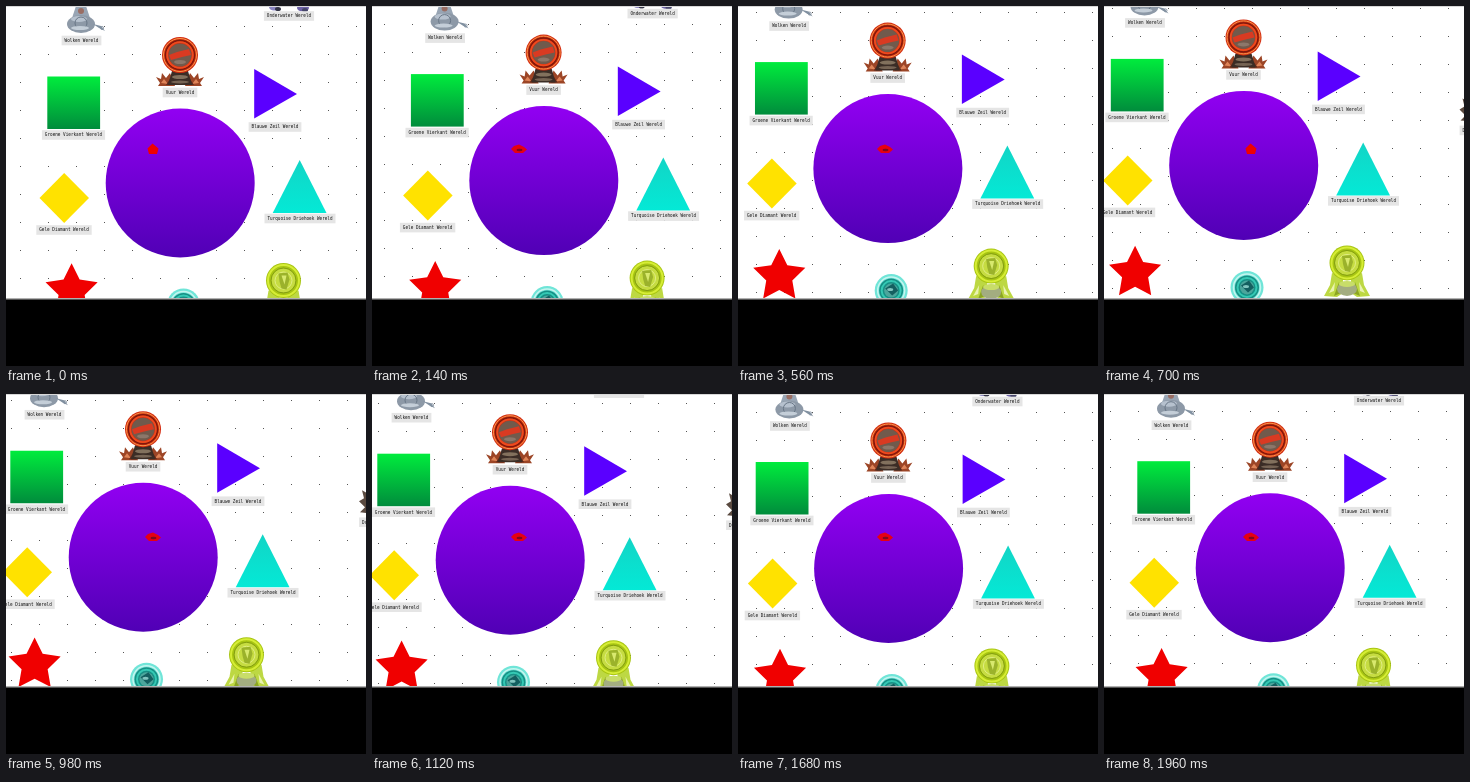
Animation, 360 px wide and 360 px high, one loop 2.1 s. Source, as an HTML page with a canvas:

```html
<!DOCTYPE html>
<html lang="nl">
<head>
<meta charset="utf-8">
<style>
html, body { margin: 0; height: 100%; overflow: hidden; background: #fff; }
canvas { display: block; width: 360px; height: 360px; }
</style>
</head>
<body>
<canvas id="stage" width="360" height="360"></canvas>
<script>
const c = document.getElementById('stage').getContext('2d');
const LOOP = 2100, STEP = 140;

// Camera stops: time, x, y
const path = [
  [0, 0, 0], [420, -13, -9.6], [700, -34.5, -17.6], [1120, -36, -10.8],
  [1400, -30.5, -4.7], [1680, -23.6, -2.5], [1960, -8, -3.3]
];

function stop(i) {
  const n = path.length, lap = Math.floor(i / n), [t, x, y] = path[i - lap * n];
  return [t + lap * LOOP, x, y];
}

// Smooth cyclic curve through the stops
function camera(t) {
  let i = path.length - 1;
  while (path[i][0] > t) i--;
  const [a, b, d, e] = [i - 1, i, i + 1, i + 2].map(stop);
  const span = d[0] - b[0], u = (t - b[0]) / span, v = 1 - u;
  return [1, 2].map(k => {
    const m = (d[k] - a[k]) / (d[0] - a[0]) * span;
    const n = (e[k] - b[k]) / (e[0] - b[0]) * span;
    return b[k] * v * v * (1 + 2 * u) + m * u * v * v + d[k] * u * u * (3 - 2 * u) - n * u * u * v;
  });
}

function poly(fill, ...pts) {
  c.fillStyle = fill;
  c.beginPath();
  for (let i = 0; i < pts.length; i += 2) c.lineTo(pts[i], pts[i + 1]);
  c.fill();
}

function oval(fill, x, y, rx, ry = rx) {
  c.fillStyle = fill;
  c.beginPath();
  c.ellipse(x, y, rx, ry, 0, 0, 7);
  c.fill();
}

function ring(color, x, y, r, width = 1) {
  c.strokeStyle = color;
  c.lineWidth = width;
  c.beginPath();
  c.arc(x, y, r, 0, 7);
  c.stroke();
}

function rect(fill, x, y, w, h) {
  c.fillStyle = fill;
  c.fillRect(x, y, w, h);
}

function shade(y1, y2, top, bottom) {
  const g = c.createLinearGradient(0, y1, 0, y2);
  g.addColorStop(0, top);
  g.addColorStop(1, bottom);
  return g;
}

function star(fill, x, y, r, inner) {
  const pts = [];
  for (let i = 0; i < 10; i++) {
    const a = i * Math.PI / 5, d = i % 2 ? r * inner : r;
    pts.push(x + d * Math.sin(a), y - d * Math.cos(a));
  }
  poly(fill, ...pts);
}

// Text is set large and scaled down to keep its letter shapes
function label(text, x, y) {
  const w = text.length * 2.6 + 6;
  rect('#e5e5e5', x - w / 2, y - 4.8, w, 9.6);
  c.save();
  c.translate(x, y);
  c.scale(0.1, 0.1);
  c.fillStyle = '#111';
  c.fillText(text, 0, 2);
  c.restore();
}

function firePortal(x, y) {
  for (const s of [-1, 1]) {
    poly('#9c4526', x + s * 5, y + 31, x + s * 22, y + 31, x + s * 20, y + 28, x + s * 24, y + 22,
      x + s * 19, y + 24, x + s * 18, y + 18, x + s * 14, y + 23, x + s * 10, y + 18);
    poly('#df8458', x + s * 12, y + 29, x + s * 19, y + 28, x + s * 16, y + 24);
    poly('#59291c', x + s * 7, y + 30, x + s * 14, y + 30, x + s * 10, y + 24);
  }
  poly('#3b2d26', x - 8, y + 16, x + 8, y + 16, x + 12, y + 30, x - 12, y + 30);
  oval('#82715d', x, y + 22, 8, 2);
  oval('#766454', x, y + 27, 9, 1.5);
  oval('#d42b10', x, y, 18);
  ring('#f69a4a', x, y, 16.5, 1);
  ring('#7d1a0c', x, y, 14.5, 1.5);
  ring('#ee4a1e', x, y, 12.8, 1.8);
  oval('#715a4c', x, y, 11.5);
  poly('#d93a22', x - 11, y, x - 3, y - 3, x + 9, y - 6, x + 11, y, x + 2, y + 2, x - 9, y + 5);
  oval('#8c776a', x, y + 7, 6, 2);
}

function limePortal(x, y) {
  for (const s of [-1, 1]) {
    poly('#bdd843', x + s * 4, y + 14, x + s * 15, y + 10, x + s * 17, y + 22, x + s * 23, y + 33,
      x + s * 10, y + 34, x + s * 4, y + 30);
    poly('#eaf3b1', x + s * 12, y + 19, x + s * 18, y + 30, x + s * 13, y + 28);
    poly('#8ca522', x + s * 8, y + 19, x + s * 13, y + 33, x + s * 6, y + 30);
  }
  oval('#a3ad80', x, y + 26, 10, 7);
  oval('#c8dd69', x, y + 21, 8, 3);
  oval('#a8c512', x, y, 17.5);
  ring('#d6ed35', x, y, 15.5, 2);
  oval('#c6dc42', x, y, 12);
  ring('#839d13', x, y, 12.5);
  ring('#e0ed83', x, y, 8.5);
  poly('#9bb22b', x - 5, y - 7, x + 4, y - 8, x + 6, y - 1, x + 3, y + 9, x - 2, y + 8, x - 4, y + 1);
  poly('#d8e96e', x - 2, y - 5, x + 3, y - 5, x + 1, y + 4);
}

function tealPortal(x, y) {
  oval('#70e5d8', x, y, 16.5);
  ring('#c5f5ef', x, y, 13.5, 1.5);
  oval('#168f85', x, y, 12);
  ring('#35c9b4', x, y, 9.5, 2);
  oval('#4ca69c', x, y, 7);
  poly('#145f60', x - 6, y - 2, x + 2, y - 7, x + 7, y, x + 1, y + 5);
  oval('#81c5bf', x - 1, y - 1, 3, 1.5);
}

function cloudPortal(x, y) {
  poly('#98a5b4', x - 5, y, x + 5, y, x + 9, y + 12, x - 9, y + 12);
  oval('#9a6e64', x, y + 5, 3, 3);
  oval('#8d99a7', x, y + 18, 14, 9);
  oval('#b6c1ce', x - 2, y + 13, 8, 3);
  ring('#687686', x, y + 17, 6);
  oval('#c4ced8', x - 1, y + 22, 9, 2);
  ring('#8f9aa8', x + 21, y + 22, 1.5);
  poly('#8190a0', x + 12, y + 18, x + 20, y + 20, x + 24, y + 25, x + 18, y + 22);
}

function waterPortal(x, y) {
  oval('#8984c1', x - 15, y + 1, 5, 3.5);
  oval('#6d62a6', x + 14, y + 2, 6, 3.5);
  oval('#323345', x - 11, y + 3, 3, 2);
  oval('#46466a', x + 16, y + 4, 3, 2);
}

function dots(dx, dy) {
  for (let x = -42; x < 420; x += 28)
    for (let y = -8; y < 330; y += 28) rect('#555', Math.round(x + dx), Math.round(y + dy), 1, 1);
}

function world() {
  cloudPortal(75, 0);
  waterPortal(283, 0);
  firePortal(174, 49);
  rect(shade(70, 123, '#00ed3d', '#008c3c'), 41.3, 70.5, 52.8, 52.5);
  poly('#5a00ff', 248.2, 63, 291, 88, 248.2, 112.5);
  oval(shade(102, 252, '#9200f2', '#5000b5'), 174.2, 177, 74.5);
  poly('#ffe200', 58.2, 167, 83, 192, 58.2, 217, 33.5, 192);
  poly(shade(154, 207, '#12d5c6', '#04e9d6'), 293.7, 154, 320.5, 207, 266.7, 207);
  star('#f00000', 65.6, 284.7, 27.4, 0.5);
  tealPortal(177.5, 299);
  limePortal(277.5, 274.5);
  poly('#5a4a40', 390, 121, 395, 118, 393, 110, 400, 114, 400, 133, 391, 132, 396, 127);

  label('Wolken Wereld', 75.5, 34.5);
  label('Onderwater Wereld', 283, 10);
  label('Vuur Wereld', 174, 86.5);
  label('Groene Vierkant Wereld', 67.5, 129);
  label('Blauwe Zeil Wereld', 269, 121);
  label('Gele Diamant Wereld', 58, 224);
  label('Turquoise Driehoek Wereld', 294, 212.5);
  label('Draken Wereld', 410, 142);
}

function player(upright) {
  if (upright) {
    poly('#f00000', 146.5, 137.5, 152.5, 142.5, 151, 148, 143, 148, 141.5, 142.5);
    return;
  }
  poly('#e60012', 139, 143, 142, 140, 147, 138.5, 152, 141, 155, 143.5, 151, 147, 143, 147);
  oval('#7c0820', 147.5, 144, 3, 1.2);
}

function draw() {
  const step = Math.floor(performance.now() % LOOP / STEP);
  const [dx, dy] = camera(step * STEP);
  rect('#fff', 0, 0, 360, 360);
  c.font = '43.3px "DejaVu Sans Mono", monospace';
  c.textAlign = 'center';
  c.textBaseline = 'middle';
  dots(dx, dy);
  c.save();
  c.translate(dx, dy);
  world();
  c.restore();
  player(step === 0 || step === 5);
  rect('#d8d8d8', 0, 0, 360, 1);
  rect('#b0b0b0', 0, 292, 360, 1);
  rect('#555', 0, 293, 360, 1);
  rect('#000', 0, 294, 360, 66);
  requestAnimationFrame(draw);
}
draw();
</script>
</body>
</html>
```
